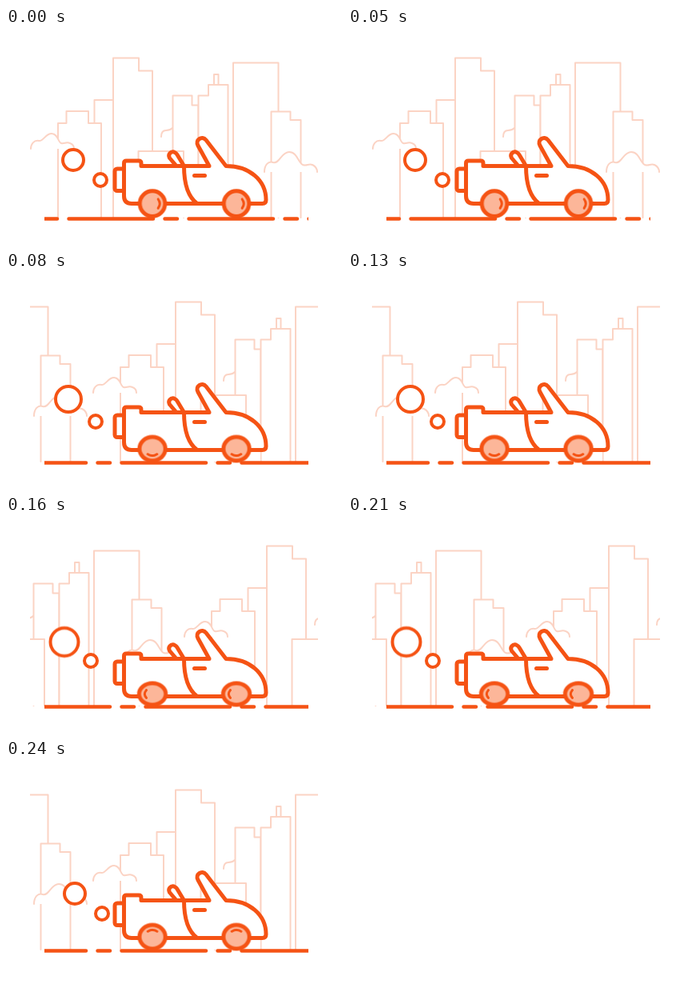
An HTML page that plays this animation: 420x270 px, repeating every 320 ms.

```html
<!DOCTYPE html>
<html lang="en">
<head>
<meta charset="utf-8">
<title>Convertible in the city</title>
<style>
  html, body { margin: 0; width: 100%; height: 100%; overflow: hidden; background: #fff; }
  svg { display: block; width: 420px; height: 270px; }
  path, circle, rect { stroke-linejoin: round; stroke-linecap: round; vector-effect: non-scaling-stroke; }
  .city { fill: #fff; stroke: #fbd3c4; stroke-width: 2; }
  .city .skyline path { stroke-linecap: butt; stroke-linejoin: miter; }
  .bold { fill: #fff; stroke: #f55314; stroke-width: 5; }
  .smoke { stroke-width: 4; }
  .wheel circle { fill: #fcb699; }
  .mark { fill: none; stroke-width: 3; }
  .line { fill: none; }
</style>
</head>
<body>
<svg viewBox="0 0 420 270">
  <defs>
    <clipPath id="view"><rect x="30" y="0" width="360" height="270"/></clipPath>
    <clipPath id="street"><rect x="48" y="230" width="330" height="16"/></clipPath>
    <g id="block">
      <g class="skyline">
        <path d="M110.500 237V90H134V237"/>
        <path d="M134 237V37.500H166V53.500H183V237"/>
        <path d="M65 237V119H75.500V104H103V119H119V237"/>
        <path d="M208.500 237V84.500H232.500V96.500H240.500V237"/>
        <path d="M260 71V58H265.500V71"/>
        <path d="M240.500 237V84.500H253V71H277.500V237"/>
        <path d="M284 237V43.500H340.500V237"/>
        <path d="M331.500 237V104.500H355.500V115H368.500V237"/>
        <path d="M165.500 237V154H222V237"/>
      </g>
      <path d="M31 151C31 145 35 140 41 141C47 142 49 132 57 132C65 132 65 143 69 144C73 145 75 142 80 144C83 145 85 148 85 151"/>
      <path d="M194 136C194 131 196 128 200 128C204 128 206 127 208 125" fill="none"/>
      <path d="M323 180C323 171 328 166 334 168C342 170 344 155 354 155C364 155 365 168 371 171C376 173 378 169 383 171C387 173 389 176 389 180"/>
    </g>
  </defs>

  <g class="city" clip-path="url(#view)">
    <g id="city"><use href="#block"/><use href="#block" x="-366"/></g>
  </g>

  <g class="bold smoke">
    <circle id="bigPuff"/>
    <circle id="smallPuff" r="8"/>
  </g>

  <rect x="150" y="215" width="168" height="22" fill="#fff"/>
  <g clip-path="url(#street)">
    <path id="road" class="bold line" style="stroke-width:4.500" d="M-71.500 238.500H530" stroke-dasharray="105.500 14.500 15.500 14.500"/>
  </g>

  <g class="bold">
    <g id="body">
      <rect x="136" y="176" width="12" height="27.500" rx="3"/>
      <path d="M213 172.500L204.500 162.500C202 158 206 154 210 155C213 156 214 158 215 160L222.500 172.500"/>
      <path d="M147.500 169Q147.500 166 150.500 166H166Q169 166 169 169V172.500H254L240 147C236 140 245 134 250 140L275 172.500C304 172.500 325 190 325 215Q325 219.500 320.500 219.500H157Q147.500 219.500 147.500 210Z"/>
      <path class="line" d="M222.500 172.500C222.500 193 226 210 239 219.500M235.500 184.500H248.500"/>
    </g>
    <g class="wheel" data-x="183"></g>
    <g class="wheel" data-x="288"></g>
  </g>
</svg>
<script>
  const STEP = 80;

  // Holds each pose for one step, then loops.
  function hold(el, poses) {
    const frames = [...poses, poses[0]].map(pose => ({ ...pose, easing: 'steps(1, end)' }));
    el.animate(frames, { duration: STEP * poses.length, iterations: Infinity });
  }

  const byId = id => document.getElementById(id);
  const move = (x, y) => ({ transform: `translate(${x}px, ${y}px)` });

  hold(byId('city'), [0, 78, 192, 78].map(x => move(x, 0)));
  hold(byId('road'), [0, 66, 96, 66].map(x => move(x, 0)));
  hold(byId('body'), [0, 3, 6, 3].map(y => move(0, y)));
  hold(byId('smallPuff'), [[118, 190], [112, 187], [106, 181], [120, 192]].map(p => move(...p)));
  hold(byId('bigPuff'), [[84, 165, 13], [78, 159, 16], [73, 157.5, 17.5], [86, 167, 13]]
    .map(([x, y, r]) => ({ ...move(x, y), r: `${r}px` })));

  const squash = [[219.5, 15.8, 15.8], [221, 16.2, 14.8], [222.5, 16.7, 13.5], [221, 16.2, 14.8]];
  for (const wheel of document.querySelectorAll('.wheel')) {
    wheel.innerHTML = '<circle r="1"/><path class="mark" d="M.45 -.36Q.72 0 .45 .36"/>';
    hold(wheel, squash.map(([y, rx, ry]) =>
      ({ transform: `translate(${wheel.dataset.x}px, ${y}px) scale(${rx}, ${ry})` })));
    hold(wheel.querySelector('.mark'), [0, 90, 180, 270].map(a => ({ transform: `rotate(${a}deg)` })));
  }
</script>
</body>
</html>
```
